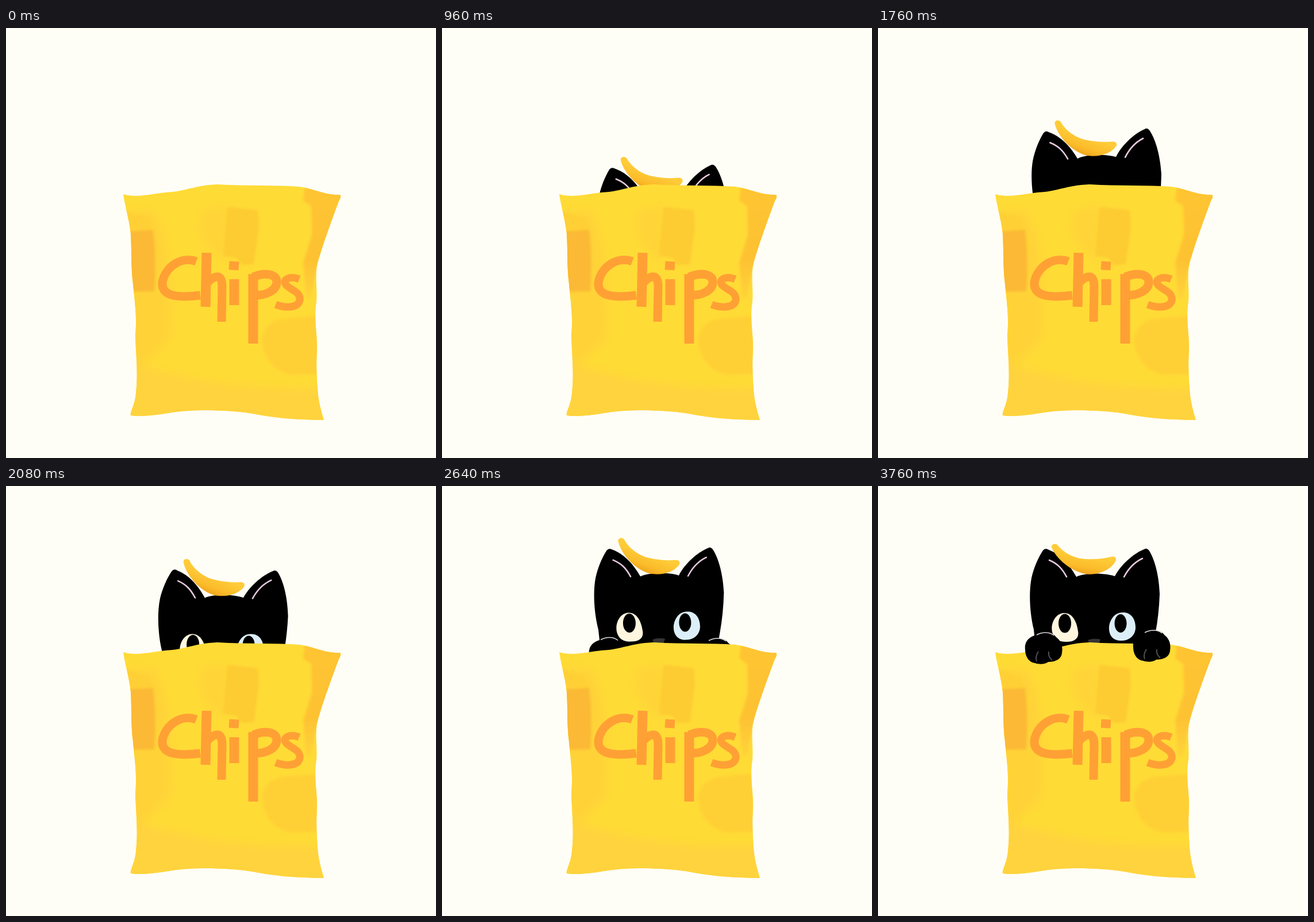
An HTML page for the animation above (3840 ms loop, 748 px wide and 748 px high).

```html
<!DOCTYPE html>
<html lang="en">
<head>
<meta charset="utf-8">
<title>Cat in a chips bag</title>
<style>
  html, body { margin: 0; width: 100%; height: 100%; overflow: hidden; background: #fffef6; }
  svg { display: block; width: 100%; height: 100%; }
</style>
</head>
<body>
<svg viewBox="0 0 748 748" fill="none">
  <defs>
    <path id="bagShape" d="M204 289 C226 296 250 289 278 286 C315 284 325 274 368 272 C420 275 465 273 510 276
      C535 279 553 291 581 290 Q584 293 579 301 C570 325 546 390 541 414 C537 436 543 460 539 484
      C536 515 542 535 541 562 C539 590 541 605 542 628 C543 650 549 668 553 682
      C510 682 465 678 430 671 C385 664 325 663 288 669 C262 673 238 677 217 674
      C215 668 225 655 226 635 C230 600 226 570 225 535 C228 500 224 480 221 445
      C217 415 219 390 217 358 C214 330 207 312 204 289Z"/>
    <clipPath id="bagClip"><use href="#bagShape"/></clipPath>
    <filter id="soft"><feGaussianBlur stdDeviation="2"/></filter>
    <filter id="softer" x="-30%" y="-30%" width="160%" height="160%"><feGaussianBlur stdDeviation="7"/></filter>
    <linearGradient id="peel" gradientUnits="userSpaceOnUse" x1="366" y1="112" x2="350" y2="154">
      <stop offset=".2" stop-color="#ffcb38"/>
      <stop offset=".65" stop-color="#fbbb2a"/>
      <stop offset="1" stop-color="#ec9d17"/>
    </linearGradient>
    <linearGradient id="fold" x1="0" y1="0" x2="0" y2="1">
      <stop offset="0" stop-color="#ffc431"/>
      <stop offset=".65" stop-color="#fdc233"/>
      <stop offset="1" stop-color="#ffd33a"/>
    </linearGradient>
    <g id="paw">
      <path fill="#000" d="M-32 31 C-34 15 -23 7 -11 5 C-2 -1 16 -1 22 9 C30 15 34 24 32 36
        C31 48 20 52 8 52 C2 57 -9 56 -15 54 C-25 53 -32 43 -32 31Z"/>
      <path stroke="#ddd" stroke-width="1.6" d="M-12 5 C-3 0 10 -1 18 6"/>
      <path stroke="#505050" stroke-width="2" d="M-9 34 C-13 40 -14 46 -12 51 M9 34 C8 41 11 46 15 49"/>
    </g>
  </defs>

  <g id="head">
    <path fill="#000" d="M287 112 Q291 107 297 111 C318 119 334 138 345 158 C360 151 394 151 412 157
      C421 139 443 118 463 110 Q468 107 472 113 C483 131 489 160 490 188 C489 215 486 240 481 264
      L478 310 H277 L271 250 C264 222 262 185 267 160 C271 142 279 124 287 112Z"/>
    <path stroke="#e6c9dc" stroke-width="2.6" stroke-linecap="round"
      d="M298 129 C312 135 320 143 328 158 M460 126 C445 133 436 143 428 158"/>
    <path fill="#fff6df" d="M323 221 C308 222 300 240 303 254 C306 267 316 272 329 271
      C343 271 350 264 348 253 C346 236 338 220 323 221Z"/>
    <path fill="#dceff8" d="M425 220 C410 220 401 236 402 250 C403 263 412 270 424 269
      C438 269 448 259 448 246 C448 230 439 219 425 220Z"/>
    <g fill="#000">
      <ellipse cx="325" cy="239" rx="11" ry="16.5"/>
      <ellipse cx="422" cy="239" rx="10.5" ry="16"/>
    </g>
    <path fill="#343434" d="M365 268 Q376 264 387 267 L384 275 H368Z"/>
    <path id="banana" fill="url(#peel)" d="M307 96 C307 90 315 89 318 94 C326 109 343 122 361 126
      C377 130 393 131 407 130 C413 130 415 134 413 138 C404 150 387 156 367 154
      C344 152 313 124 307 96Z"/>
  </g>
  <g id="pawsBehind"></g>

  <use href="#bagShape" fill="#ffdb36"/>
  <g clip-path="url(#bagClip)">
    <g filter="url(#softer)">
      <path fill="#ffd33c" d="M200 575 C280 605 400 632 560 626 V720 H200Z"/>
      <path fill="#ffd338" d="M200 320 H258 Q292 370 286 540 L235 590 H200Z"/>
      <path fill="#ffd437" d="M340 320 L384 310 V405 Q345 385 337 350Z"/>
    </g>
    <g filter="url(#soft)">
      <path fill="#ffd034" d="M206 318 L248 330 L258 354 L214 360Z"/>
      <path fill="#fbb936" d="M210 354 L256 351 Q262 400 258 458 L215 459Z"/>
      <path fill="#fdcb33" d="M385 311 L438 317 L440 345 L431 411 L410 412 L401 400 L378 396Z"/>
      <path fill="url(#fold)" d="M520 277 L590 285 L540 420 L530 470 L522 470 L517 408 L532 360 L531 310 L517 300Z"/>
      <path fill="#ffd035" d="M445 540 Q452 510 482 506 L545 500 V602 L492 603 Q448 590 445 540Z"/>
    </g>
  </g>

  <g role="img" aria-label="Chips" stroke="#ffa035" stroke-width="15">
    <path d="M331 406 C304 396 276 417 272 443 C270 469 305 469 338 465"/>
    <path stroke-width="17" d="M349 391 L347 485"/>
    <path d="M351 442 C365 428 376 429 376 450 L375 511"/>
    <path stroke-width="17" d="M397 406 L396 421 M397 437 L397 482 M430 428 L430 549"/>
    <path d="M430 433 C452 424 472 428 471 443 C470 457 452 465 433 465"/>
    <path stroke-width="13" d="M510 437 C493 430 479 438 488 448 C496 456 513 459 511 474 C507 488 484 487 469 481"/>
  </g>

  <g id="pawsFront"></g>
  <g id="paws">
    <use href="#paw"/>
    <use href="#paw"/>
  </g>
</svg>
<script>
const LOOP = 3840, STEP = 80, GRIP = 2720;
const $ = id => document.getElementById(id);
const [leftPaw, rightPaw] = $('paws').children;

const linear = u => u;
const smooth = u => u * u * (3 - 2 * u);

// Value at time t along [time, value] keys
function track(t, keys, ease = linear) {
  const next = keys.findIndex(key => key[0] > t);
  if (next === 0) return keys[0][1];
  if (next < 0) return keys[keys.length - 1][1];
  const [t0, v0] = keys[next - 1], [t1, v1] = keys[next];
  return v0 + (v1 - v0) * ease((t - t0) / (t1 - t0));
}

const rise = [[0, 206], [480, 170], [1360, 99], [1680, 76], [2080, 37], [2240, 26],
              [2640, -1], [2880, -4], [3120, 0]];
const sway = [[480, 5], [1360, 11], [2080, 0], [2640, 1], [3120, -1], [3760, 0]];
const tilt = [[480, 2], [1360, -4.6], [2080, 0.6], [2640, -0.6], [3120, -2.2], [3760, 0]];
const settle = [[3120, 0], [3760, 1]];
const pawLift = [[2400, 60], [2640, 10], [2720, 0]];
const pawStretch = [[2720, 0.6], [3120, 0.89], [3440, 1]];

function draw(t) {
  const x = track(t, sway, smooth), y = track(t, rise), angle = track(t, tilt, smooth);
  $('head').setAttribute('transform', `translate(${x} ${y}) rotate(${angle} 378 250)`);

  const s = track(t, settle, smooth);
  $('banana').setAttribute('transform', `translate(${4 * s} ${-s}) rotate(${-10 * s} 370 153)`);

  const gripping = t >= GRIP;
  const lift = track(t, pawLift), stretch = gripping ? track(t, pawStretch) : 1;
  $(gripping ? 'pawsFront' : 'pawsBehind').append($('paws'));
  leftPaw.setAttribute('transform', `translate(288 ${254 + lift * 0.85}) scale(1 ${stretch})`);
  rightPaw.setAttribute('transform', `translate(476 ${250 + lift * 1.4}) scale(1 ${stretch})`);
}

function frame() {
  draw(Math.floor(performance.now() % LOOP / STEP) * STEP);
  requestAnimationFrame(frame);
}
frame();
</script>
</body>
</html>
```
